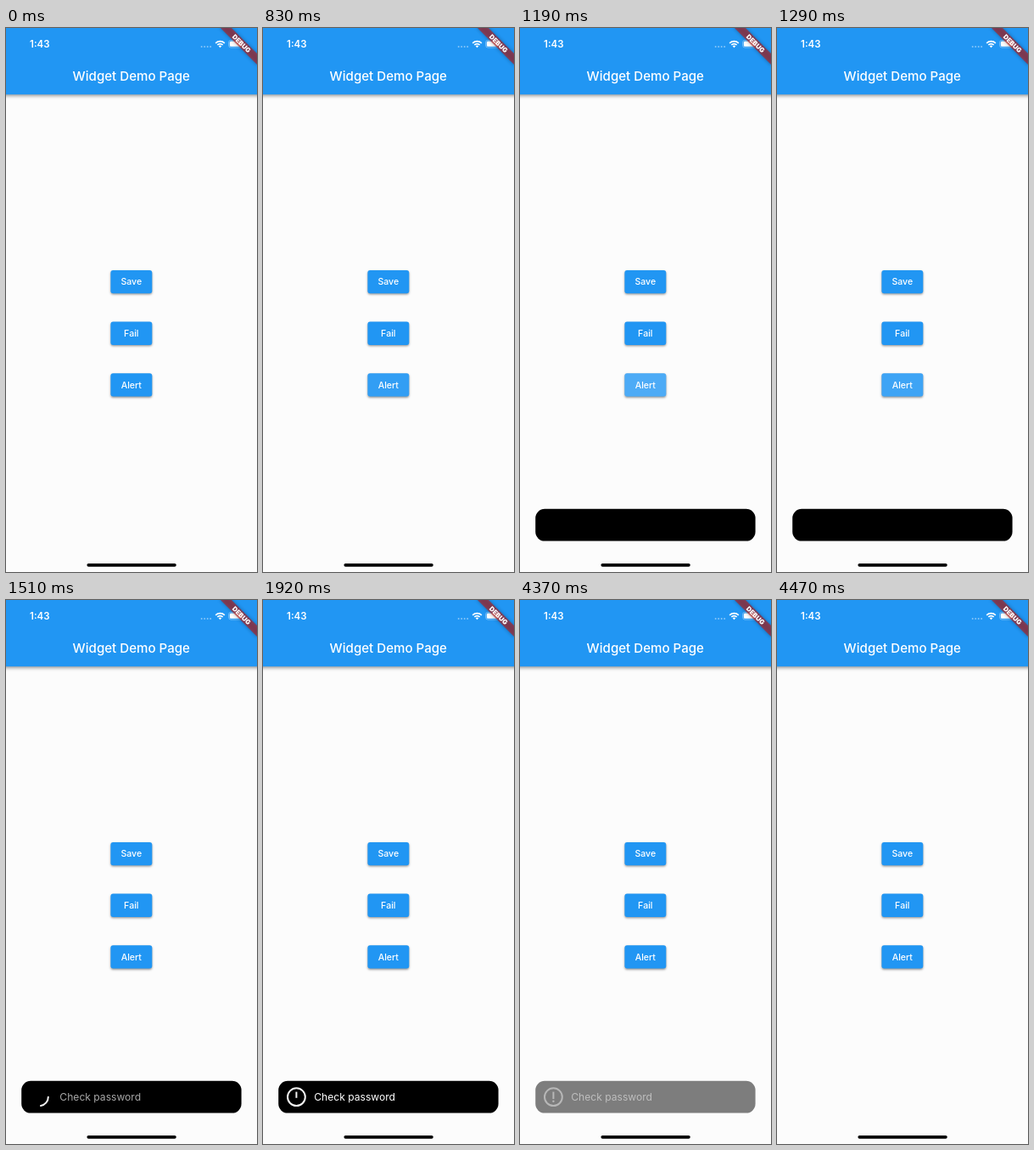
Animation, 296 px wide and 640 px high, one loop 4540 ms. Source, as an HTML page with a canvas:

```html
<!DOCTYPE html>
<html lang="en">
<head>
<meta charset="utf-8">
<title>Widget Demo Page</title>
<style>
  html, body { margin: 0; width: 100%; height: 100%; overflow: hidden; background: #fcfcfc; }
  canvas { display: block; width: 296px; height: 640px; }
</style>
</head>
<body>
<canvas id="stage"></canvas>
<script>
const W = 296, H = 640, LOOP = 4540;
const BLUE = '#2196f3';
const FONT = 'Inter, Roboto, "Liberation Sans", sans-serif';
// The screen refreshes only at these times.
const STEPS = [0, 830, 950, 1070, 1190, 1290, 1400, 1510, 1610, 1710, 1820, 1920, 4260, 4370, 4470];
const GLOW = { 830: 0.08, 950: 0.17, 1070: 0.24, 1190: 0.2, 1290: 0.13, 1400: 0.05 };

const canvas = document.getElementById('stage');
const ctx = canvas.getContext('2d');
const dpr = window.devicePixelRatio || 1;
canvas.width = W * dpr;
canvas.height = H * dpr;

const clamp = v => Math.max(0, Math.min(1, v));

function roundRect(x, y, w, h, r, fill) {
  ctx.beginPath();
  ctx.roundRect(x, y, w, h, r);
  ctx.fillStyle = fill;
  ctx.fill();
}

function label(str, x, y, size, weight, align = 'center') {
  ctx.font = `${weight} ${size}px ${FONT}`;
  ctx.textAlign = align;
  ctx.fillStyle = '#fff';
  ctx.fillText(str, x, y);
}

function line(x1, y1, x2, y2) {
  ctx.beginPath();
  ctx.moveTo(x1, y1);
  ctx.lineTo(x2, y2);
  ctx.stroke();
}

function withShadow(color, blur, dy, draw) {
  ctx.save();
  ctx.shadowColor = color;
  ctx.shadowBlur = blur * dpr;
  ctx.shadowOffsetY = dy * dpr;
  draw();
  ctx.restore();
}

function statusBar() {
  label('1:43', 39.8, 22.9, 11.5, 600);

  ctx.fillStyle = 'rgba(255,255,255,0.45)';
  for (let i = 0; i < 4; i++) {
    ctx.beginPath();
    ctx.arc(230.7 + i * 3.5, 22, 1, 0, Math.PI * 2);
    ctx.fill();
  }

  const cx = 252.5, cy = 23.2, from = -Math.PI * 0.75, to = -Math.PI * 0.25;
  ctx.strokeStyle = ctx.fillStyle = '#fff';
  ctx.lineWidth = 1.7;
  for (const r of [4.5, 7.5]) {
    ctx.beginPath();
    ctx.arc(cx, cy, r, from, to);
    ctx.stroke();
  }
  ctx.beginPath();
  ctx.moveTo(cx, cy);
  ctx.arc(cx, cy, 2.6, from, to);
  ctx.fill();

  ctx.strokeStyle = 'rgba(255,255,255,0.45)';
  ctx.lineWidth = 0.8;
  ctx.beginPath();
  ctx.roundRect(262.6, 14.4, 17, 8.6, 2.6);
  ctx.stroke();
  roundRect(263.8, 15.6, 14.6, 6.2, 1.6, '#fff');
}

function banner() {
  ctx.save();
  ctx.translate(W, 0);
  ctx.rotate(Math.PI / 4);
  withShadow('rgba(0,0,0,0.5)', 4.5, 0, () => {
    ctx.fillStyle = 'rgba(183,28,28,0.63)';
    ctx.fillRect(-31, 21.2, 62, 9.2);
  });
  label('DEBUG', 0, 28.6, 7.7, 900);
  ctx.restore();
}

function header() {
  withShadow('rgba(0,0,0,0.4)', 4, 1.8, () => {
    ctx.fillStyle = BLUE;
    ctx.fillRect(-10, -10, W + 20, 88.2);
  });
  label('Widget Demo Page', 147.8, 62.4, 15.1, 500);
  statusBar();
  banner();
}

function button(str, y, glow) {
  withShadow('rgba(0,0,0,0.4)', 2.6, 1.3, () => roundRect(123.4, y, 48.9, 27.3, 3, BLUE));
  if (glow) roundRect(123.4, y, 48.9, 27.3, 3, `rgba(255,255,255,${glow})`);
  label(str, 147.8, y + 17.4, 10.6, 500);
}

function alertIcon(t) {
  const cx = 39.4, cy = 584.7;
  const turn = clamp((t - 1420) / 400);
  ctx.strokeStyle = ctx.fillStyle = '#f2f2f2';
  ctx.lineWidth = 2;
  ctx.lineCap = 'round';
  if (turn > 0) {
    ctx.beginPath();
    ctx.arc(cx, cy, 10.4, 0, turn * Math.PI * 2);
    ctx.stroke();
  }
  ctx.lineCap = 'butt';
  if (t >= 1920) line(cx, 578.6, cx, t >= 4260 ? 587 : 585.8);
  if (t >= 4260) {
    ctx.beginPath();
    ctx.arc(cx, 589.8, 1.2, 0, Math.PI * 2);
    ctx.fill();
  }
}

function toast(t) {
  if (t < 1190 || t >= 4470) return;
  ctx.save();
  const fade = t >= 4370 ? 0.5 : 1;
  ctx.globalAlpha = fade;
  roundRect(18.2, 565.7, 259.4, 37.9, 11, '#000');
  alertIcon(t);
  const p = clamp((t - 1290) / 400);
  ctx.globalAlpha = fade * clamp(p * 1.2);
  label('Check password', 60.2 + (1 - p) * 7, 589, 12.1, 400, 'left');
  ctx.restore();
}

function draw(now) {
  const time = now % LOOP;
  const t = STEPS.findLast(s => s <= time);
  ctx.setTransform(dpr, 0, 0, dpr, 0, 0);
  ctx.fillStyle = '#fcfcfc';
  ctx.fillRect(0, 0, W, H);
  header();
  ['Save', 'Fail', 'Alert'].forEach((name, i) =>
    button(name, 284.9 + i * 60.7, i === 2 ? GLOW[t] : 0));
  toast(t);
  roundRect(95.4, 629.9, 105.4, 3.8, 1.9, '#000');
}

let start;
function tick(now) {
  start ??= now;
  draw(Math.max(0, now - start));
  requestAnimationFrame(tick);
}
draw(0);
requestAnimationFrame(tick);
</script>
</body>
</html>
```
